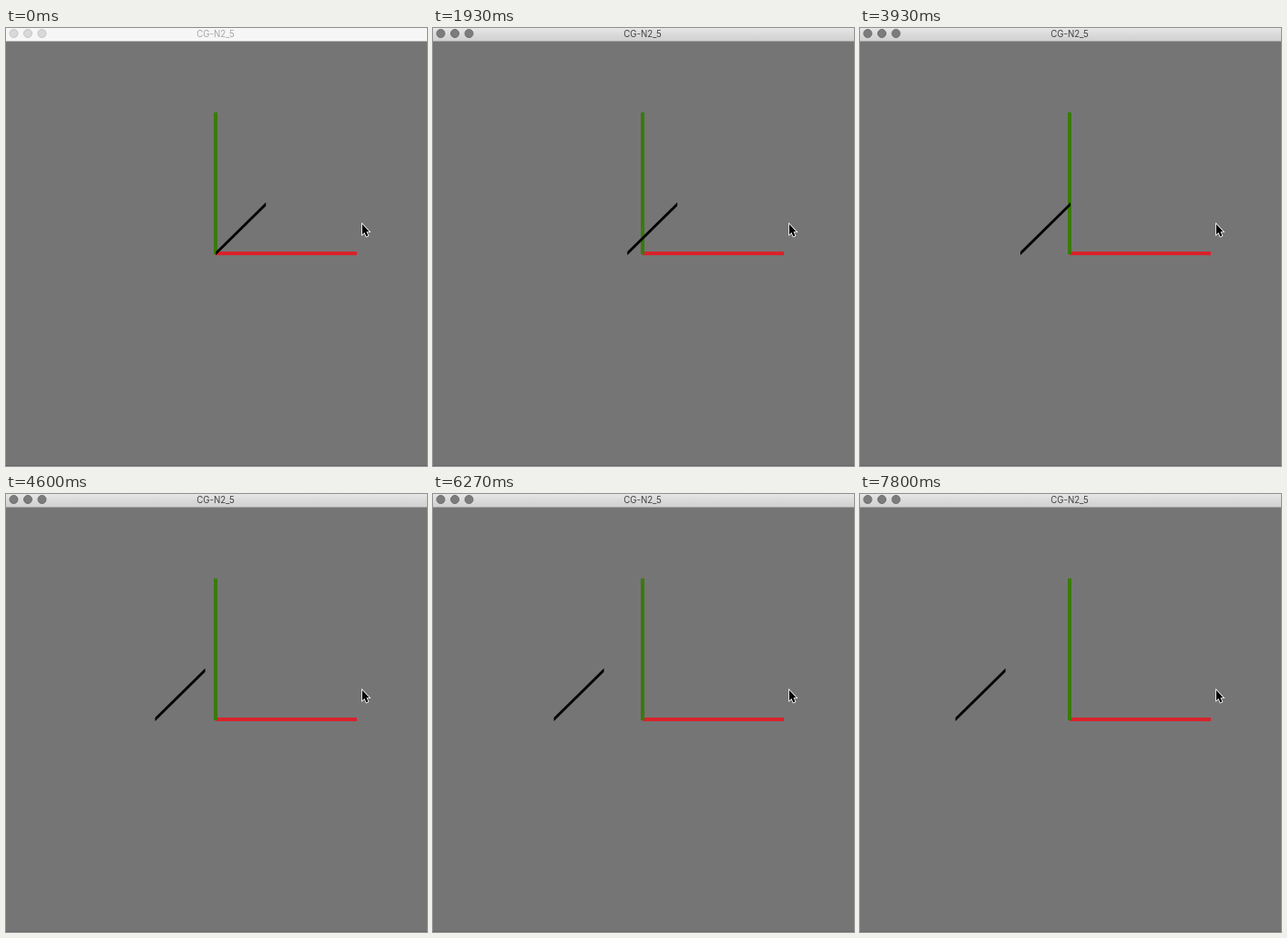
Animation, 462 px wide and 480 px high, one loop 8 s. Source, as an HTML page:

```html
<!DOCTYPE html>
<html lang="en">
<head>
<meta charset="utf-8">
<title>CG-N2_5</title>
<style>
  html, body { margin: 0; width: 100%; height: 100%; overflow: hidden; background: #757575; }
  svg { display: block; width: 462px; height: 480px; }
  text { font: 9.7px Inter, Roboto, sans-serif; text-anchor: middle; }
</style>
</head>
<body>
<svg viewBox="0 0 462 480">
  <defs>
    <linearGradient id="chrome" x2="0" y2="1">
      <stop stop-color="#e6e6e6"/>
      <stop offset="1" stop-color="#d0d0d0"/>
    </linearGradient>
  </defs>
  <rect width="462" height="480" fill="#757575"/>
  <rect y="479" width="462" height="1" fill="#6c656a"/>

  <rect id="bar" width="462" height="14"/>
  <rect id="edge" y="14" width="462" height="1"/>
  <g id="lights">
    <circle cx="8.5" cy="6" r="4.5"/>
    <circle cx="24" cy="6" r="4.5"/>
    <circle cx="39.5" cy="6" r="4.5"/>
  </g>
  <text id="title" x="230" y="10">CG-N2_5</text>

  <rect x="230" y="245" width="155" height="4" fill="#d8222b"/>
  <rect x="228" y="92.5" width="4" height="155.5" fill="#3a7a0a"/>
  <path id="depth" d="M230.3 245 L285.2 191 V195 L230.3 249 Z"/>

  <path d="M391 215 v11.3 l2.5 -2.3 l1.9 4.4 l2 -0.9 l-1.9 -4.3 h3.2 z"
        stroke="#fff" stroke-width="1.6" paint-order="stroke"/>
</svg>
<script>
  const LOOP = 8000;
  const TICK = 1000 / 15;
  const STEP = 1.55;
  const FIRST_PRESS = 10, REPEAT = 18, FOCUS = 5;
  const $ = id => document.getElementById(id);

  // Key repeat runs slower than the ticks: one tick in five brings no move.
  const moves = k => k === FIRST_PRESS || (k >= REPEAT && k % 5 !== (k < 40 ? 1 : 0));

  function stepsUntil(tick) {
    let n = 0;
    for (let k = 0; k <= tick; k++) if (moves(k)) n++;
    return n;
  }

  function paint(id, fill, stroke = "none") {
    $(id).setAttribute("fill", fill);
    $(id).setAttribute("stroke", stroke);
  }

  function render(t) {
    const tick = Math.floor((t + 3.5) / TICK);
    const active = tick >= FOCUS;
    paint("bar", active ? "url(#chrome)" : "#f6f6f6");
    paint("edge", active ? "#a2a2a2" : "#b8b8b8");
    paint("lights", active ? "#7c7c7c" : "#d8d8d8", active ? "#6e6e6e" : "#c6c6c6");
    paint("title", active ? "#404040" : "#a6a6a6");
    $("depth").setAttribute("transform", `translate(${-STEP * stepsUntil(tick)} 0)`);
  }

  const start = performance.now();
  function loop() {
    render((performance.now() - start) % LOOP);
    requestAnimationFrame(loop);
  }
  loop();
</script>
</body>
</html>
```
